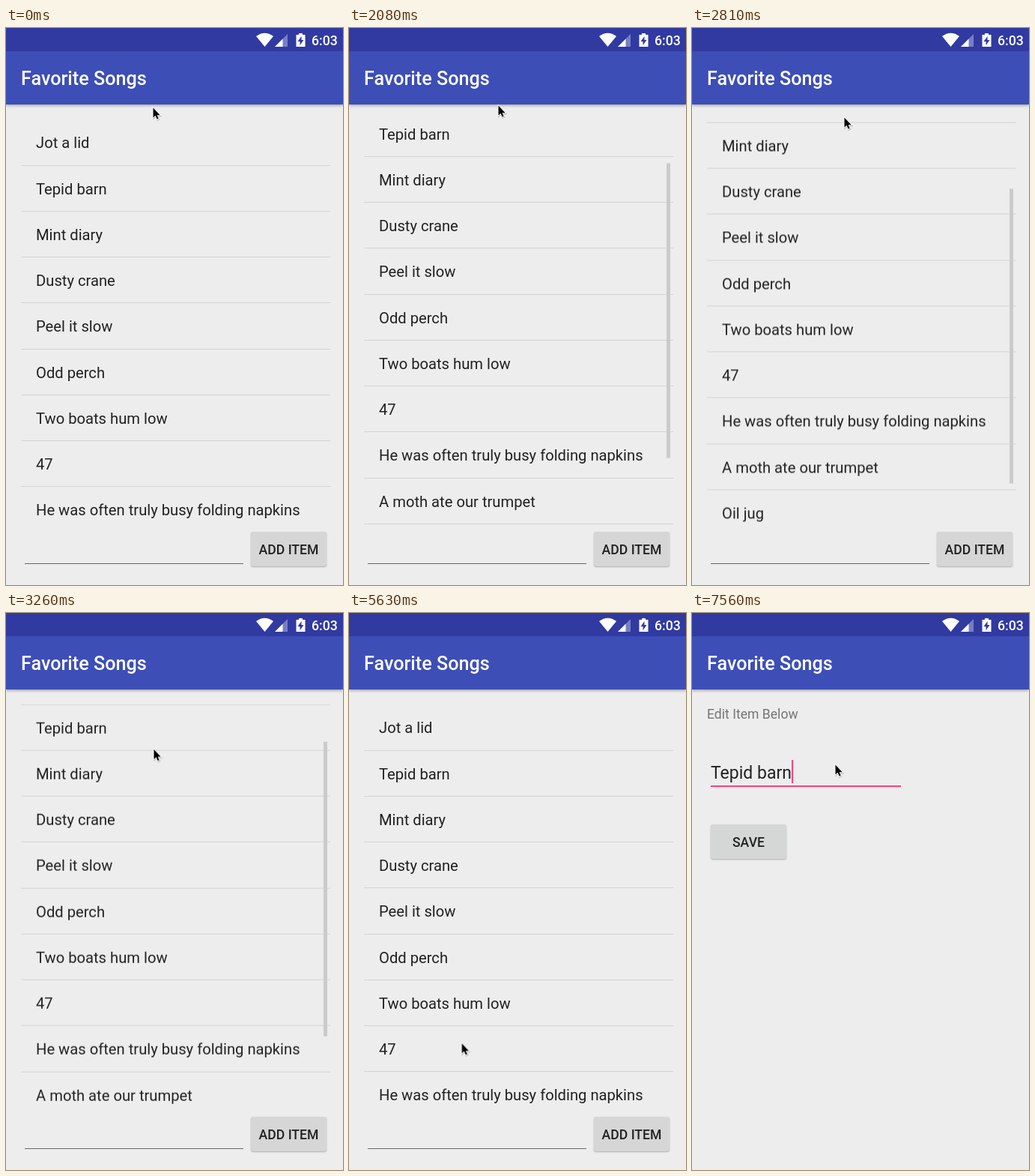
An HTML page for the animation above (8 s loop, 450 by 743 pixels).

```html
<!DOCTYPE html>
<html lang="en">
<head>
<meta charset="utf-8">
<title>Favorite Songs</title>
<style>
  html, body { margin: 0; width: 100%; height: 100%; overflow: hidden; background: #ededed; }
  body { position: relative; font: 20.2px Roboto, sans-serif; color: #212121; }
  body, body * { box-sizing: border-box; }

  .screen, .abs, .cursor, .status { position: absolute; }
  .screen { left: 0; top: 0; width: 450px; height: 743px; background: #ededed; overflow: hidden; }
  .status { left: 330px; top: 0; }
  .bar {
    height: 102px; padding: 31px 0 0 20px;
    background: linear-gradient(#303aa1 31px, #3d4eb7 31px);
    box-shadow: 0 1px 4px rgba(0, 0, 0, .4);
    color: #fff; font-size: 25.2px; font-weight: 500; line-height: 74px;
  }
  .button {
    position: absolute; width: 101px; height: 46px; border-radius: 3px;
    background: #d6d6d6; box-shadow: 0 1px 2px rgba(0, 0, 0, .28);
    font-size: 17.6px; font-weight: 500; line-height: 49px; text-align: center;
  }
  .line { left: 25px; }

  .list { position: absolute; left: 20px; top: 122px; width: 413px; height: 543px; overflow: hidden; }
  .rows { padding-top: .3px; }
  .row {
    position: relative; height: 61.28px; padding-left: 20px; overflow: hidden;
    border-bottom: 1px solid #d3d3d3; line-height: 63px; white-space: nowrap;
  }
  .row span { position: relative; }
  .thumb { left: 404px; top: 3.5px; width: 5px; height: 393px; background: #cbcbcb; }
  .press { inset: 0; background: #e8e8e8; }
  .press::after {
    content: ""; position: absolute; left: 33px; top: -129px;
    width: 320px; height: 320px; border-radius: 50%; background: #dedede;
  }
  .glow { left: 0; top: 0; transform-origin: top; }

  /* 54 ticks per loop; each keyframe's steps() counts the ticks to the next one */
  .rows, .thumb, .press, .glow, .edit, .caret, .cursor {
    animation: 8s steps(1) -12ms infinite;
  }
  .rows { animation-name: scroll; }
  .thumb { animation-name: thumb, thumb-fade; }
  .press { animation-name: press; }
  .glow { animation-name: glow; }
  .edit { animation-name: open; }
  .caret { animation-name: blink; }
  .cursor { left: 0; top: 0; animation-name: point; }

  @keyframes scroll {
    0% { transform: translateY(0); }
    18.52% { transform: translateY(0); animation-timing-function: steps(4); }
    25.93% { transform: translateY(-73px); animation-timing-function: steps(3); }
    31.48% { transform: translateY(-118.5px); }
    35.19% { transform: translateY(-118.5px); animation-timing-function: steps(6); }
    46.3% { transform: translateY(-4px); }
    48.15%, 100% { transform: translateY(0); }
  }
  @keyframes thumb {
    0% { transform: translateY(0); }
    18.52% { transform: translateY(0); animation-timing-function: steps(4); }
    25.93% { transform: translateY(54.5px); animation-timing-function: steps(3); }
    31.48% { transform: translateY(88.5px); }
    35.19% { transform: translateY(88.5px); animation-timing-function: steps(6); }
    46.3% { transform: translateY(3px); }
    48.15%, 100% { transform: translateY(0); }
  }
  @keyframes thumb-fade {
    0% { opacity: 0; }
    20.37% { opacity: 1; }
    50% { opacity: 1; animation-timing-function: steps(2); }
    53.7%, 100% { opacity: 0; }
  }
  @keyframes glow {
    0% { opacity: 0; transform: scaleY(.3); }
    46.3% { opacity: 0; transform: scaleY(.3); animation-timing-function: steps(5); }
    55.56% { opacity: 1; transform: none; }
    59.26% { opacity: 1; transform: none; animation-timing-function: steps(5); }
    68.52%, 100% { opacity: 0; transform: scaleY(.3); }
  }
  @keyframes press {
    0% { opacity: 0; }
    81.48%, 100% { opacity: 1; }
  }
  @keyframes open {
    0% { opacity: 0; transform: translateY(18px); }
    83.33% { opacity: .75; transform: translateY(18px); }
    85.19%, 100% { opacity: 1; transform: none; }
  }
  @keyframes blink {
    0% { opacity: 1; }
    88.89% { opacity: 0; }
    94.44%, 100% { opacity: 1; }
  }
  @keyframes point {
    0% { transform: translate(195px, 105px); }
    1.85% { transform: translate(196px, 105px); }
    9.26% { transform: translate(196px, 105px); animation-timing-function: steps(2); }
    12.96% { transform: translate(196px, 208px); }
    18.52% { transform: translate(196px, 175px); animation-timing-function: steps(4); }
    25.93% { transform: translate(198px, 102px); animation-timing-function: steps(3); }
    31.48% { transform: translate(202px, 60px); animation-timing-function: steps(2); }
    35.19% { transform: translate(202px, 118px); animation-timing-function: steps(6); }
    46.3% { transform: translate(190px, 243px); animation-timing-function: steps(5); }
    55.56% { transform: translate(150px, 620px); animation-timing-function: steps(3); }
    61.11% { transform: translate(146px, 686px); }
    62.96% { transform: translate(145px, 692px); }
    68.52% { transform: translate(145px, 692px); animation-timing-function: steps(4); }
    75.93% { transform: translate(162px, 215px); }
    87.04% { transform: translate(162px, 215px); animation-timing-function: steps(4); }
    94.44%, 100% { transform: translate(190px, 201px); }
  }
</style>
</head>
<body>
  <div class="screen">
    <div class="bar">Favorite Songs</div>
    <div class="list">
      <div class="rows">
        <div class="row">Jot a lid</div>
        <div class="row"><div class="abs press"></div><span>Tepid barn</span></div>
        <div class="row">Mint diary</div>
        <div class="row">Dusty crane</div>
        <div class="row">Peel it slow</div>
        <div class="row">Odd perch</div>
        <div class="row">Two boats hum low</div>
        <div class="row">47</div>
        <div class="row">He was often truly busy folding napkins</div>
        <div class="row">A moth ate our trumpet</div>
        <div class="row">Oil jug</div>
      </div>
      <svg class="abs glow" width="413" height="24">
        <path d="M0 0H413V12Q206 33 0 12Z" fill="#3f51b5" fill-opacity=".05"/>
      </svg>
      <div class="abs thumb"></div>
    </div>
    <div class="abs line" style="top:714px;width:292px;height:1px;background:#686868"></div>
    <div class="button" style="left:327px;top:672px">ADD ITEM</div>
  </div>

  <div class="screen edit">
    <div class="bar">Favorite Songs</div>
    <div class="abs" style="left:20px;top:122px;font-size:17.6px;line-height:26px;color:#757575">Edit Item Below</div>
    <div class="abs line" style="top:198px;font-size:23px;line-height:31px">Tepid barn</div>
    <div class="abs caret" style="left:133px;top:196px;width:2px;height:31px;background:#ff4081"></div>
    <div class="abs line" style="top:230px;width:254px;height:2px;background:#ff4081"></div>
    <div class="button" style="left:25px;top:282px;background:#d5d7d7">SAVE</div>
  </div>

  <svg class="status" width="120" height="31" fill="#fff">
    <path d="M4 11Q15.5 2.5 27 11L15.5 25Z"/>
    <path d="M29 25H46V8Z" fill-opacity=".35"/>
    <path d="M29 25H39.5V14.5Z"/>
    <path d="M61 7H66V9H69.500V25H57.500V9H61ZM64.500 11L59.500 18H62.500V23L67.500 16H64.500Z" fill-rule="evenodd"/>
    <text x="78" y="22.5" font-size="17.7" font-weight="500">6:03</text>
  </svg>

  <svg class="cursor" width="16" height="21">
    <defs>
      <path id="arrow" d="M1.5 1.5V14.5L4.5 11.8L6.6 16.6L8.700 15.700L6.600 11.200H10.700Z"/>
    </defs>
    <use href="#arrow" x=".6" y="1" fill="none" stroke="#000" stroke-opacity=".2" stroke-width="2"/>
    <use href="#arrow" stroke="#fff" stroke-width="1.6" paint-order="stroke"/>
  </svg>
</body>
</html>
```
